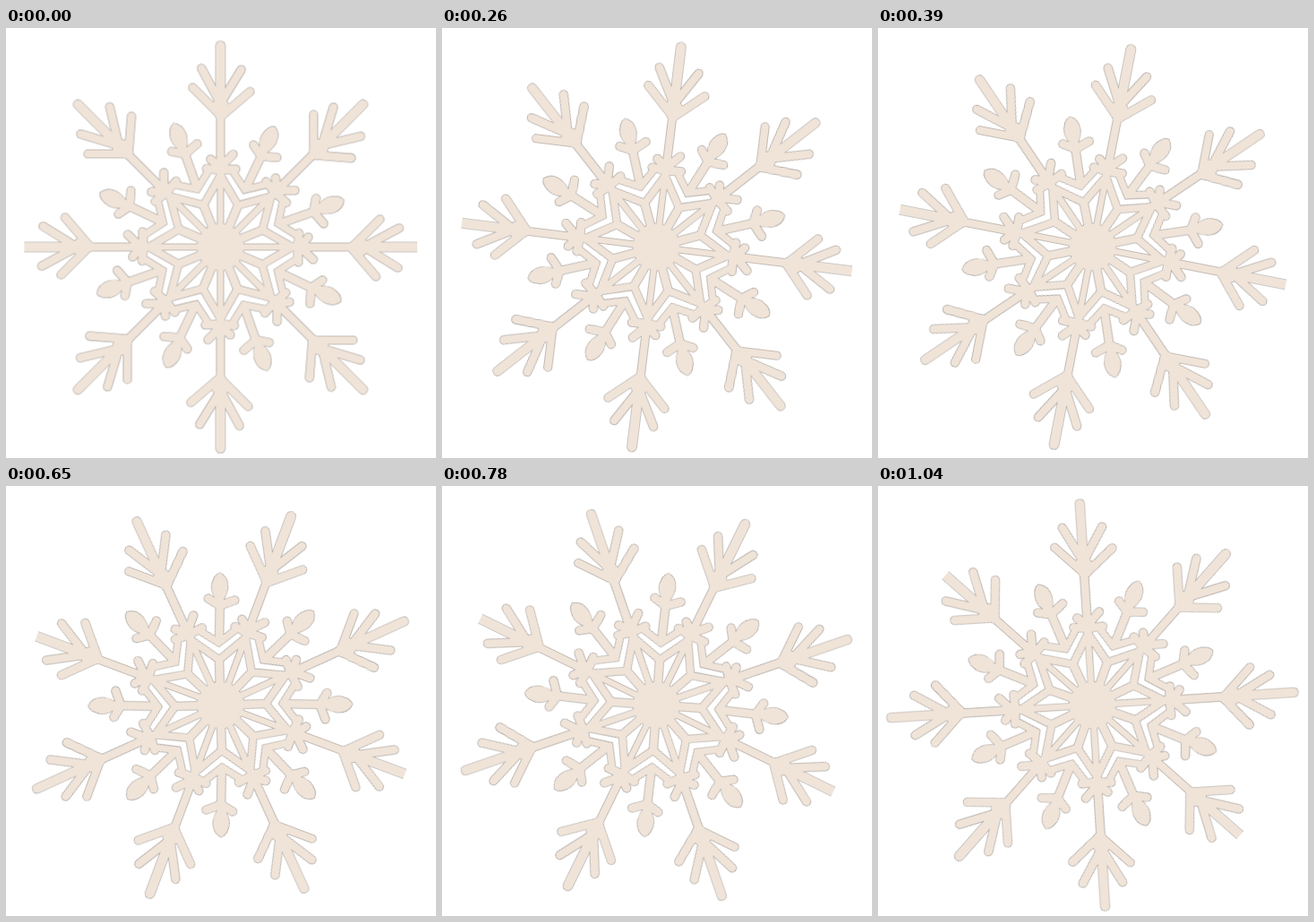
An HTML page that plays this animation: 480 by 480 pixels, repeating every 1170 ms.

```html
<!DOCTYPE html>
<html lang="en">
<head>
<meta charset="utf-8">
<title>Snowflake</title>
<style>
  html, body { margin: 0; width: 100%; height: 100%; overflow: hidden; background: #fff; }
  svg { display: block; width: 100vw; height: 100vh; }

  /* --edge widens every stroke, so the same parts also draw the thin rim */
  .rim { --edge: 1.1px; color: #999490; }
  .body { --edge: 0px; color: #f0e4d9; }

  .line { fill: none; stroke: currentColor; stroke-linecap: round; stroke-linejoin: round; stroke-width: calc(var(--w) + var(--edge)); }
  .solid { fill: currentColor; stroke: currentColor; stroke-width: var(--edge); }
  .stem { --w: 10px; }
  .twig { --w: 9px; }
  .band { --w: 7.5px; stroke-linejoin: miter; }
  .star { --w: 8px; stroke-linejoin: miter; }
  .spoke { --w: 7px; }
  .petal { --w: 9px; }

  .spin { transform-origin: 0 0; animation: spin 1170ms step-end infinite; }
  @keyframes spin {
    0% { transform: rotate(0deg); }
    11.111% { transform: rotate(3.4deg); }
    22.222% { transform: rotate(7deg); }
    33.333% { transform: rotate(11deg); }
    44.444% { transform: rotate(15.2deg); }
    55.555% { transform: rotate(20.5deg); }
    66.666% { transform: rotate(26.1deg); }
    77.777% { transform: rotate(32.3deg); }
    88.888%, 100% { transform: rotate(41.4deg); }
  }
</style>
</head>
<body>
<svg viewBox="0 0 480 480">
  <defs>
    <!-- the two level arms have cut-off tips -->
    <clipPath id="cut"><rect x="-218.5" y="-240" width="438" height="480"/></clipPath>

    <g id="sector">
      <path class="line stem" d="M0-160V-225"/>
      <path class="line twig" d="M0-80V-165"/>
      <path class="line twig" d="M-31-178L-2-149M-21.2-199.5L-1-162M23.2-198L1-162M33-173.5L2-147"/>
      <path class="solid" d="M-4-143L-11-158L-6-164L0-170L6-164L11-157L4-143Z"/>

      <path class="line twig" d="M0-89L-11-98M0-89L14-103.5M-15.5-87.5L0-86L17-87"/>

      <path class="line band" d="M14-84L27.2-64L49.5-69.3"/>
      <path class="line star" d="M0-80L19.7-46.5L56.6-56.6"/>
      <path class="line spoke" d="M0 0V-80"/>
      <path class="line petal" d="M0 0L19-45"/>

      <g transform="rotate(24.2)">
        <path class="line twig" d="M-1-72L0-115M-13-119L0-111L16.5-117"/>
        <path class="solid" d="M0-108C-4-118-10-124-9-133C-8-141-4-146 0-147.5C5-145 9-140 9-132C9-124 4-118 0-108Z"/>
      </g>
    </g>

    <g id="flake">
      <circle class="solid" r="26"/>
      <use href="#sector"/>
      <use href="#sector" transform="rotate(45)"/>
      <use href="#sector" transform="rotate(90)"/>
      <use href="#sector" transform="rotate(135)"/>
      <use href="#sector" transform="rotate(180)"/>
      <use href="#sector" transform="rotate(225)"/>
      <use href="#sector" transform="rotate(270)"/>
      <use href="#sector" transform="rotate(315)"/>
    </g>
  </defs>

  <g transform="translate(239.4 244.5)">
    <g class="spin">
      <g clip-path="url(#cut)">
        <use class="rim" href="#flake"/>
        <use class="body" href="#flake"/>
      </g>
    </g>
  </g>
</svg>
</body>
</html>
```
